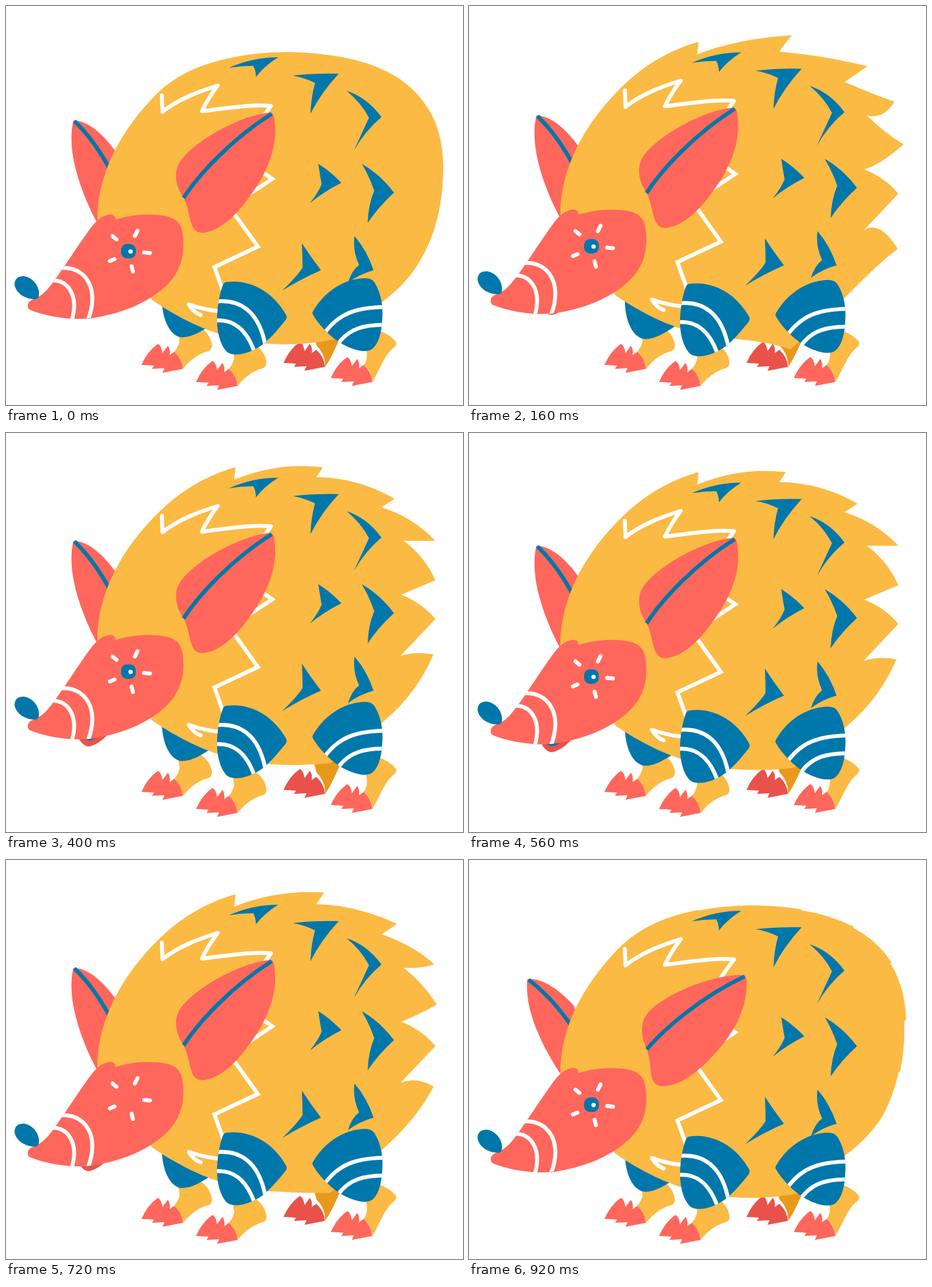
Write an HTML page that moves like this. It is 695 px wide and 607 px high and loops after 0.96 s.

```html
<!DOCTYPE html>
<html lang="en">
<head>
<meta charset="utf-8">
<title>Spiky animal</title>
<style>
html, body { margin: 0; width: 100%; height: 100%; overflow: hidden; background: #fff; }
svg { display: block; width: 100%; height: 100%; }
.y { fill: #fbba44; }
.b { fill: #0077aa; }
.c { fill: #ff675c; }
.d { fill: #e8524a; }
.w, .s { fill: none; stroke: #fff; stroke-width: 6; }
.r { stroke-linecap: round; stroke-linejoin: round; }
.s { stroke: #0077aa; }
</style>
</head>
<body>
<svg viewBox="0 0 695 607">
<defs>
  <path id="toes" d="M206 546Q215 525 231 514Q236 516 238 528L246 517Q250 521 249 531L256 526Q268 537 269 552L238 558L241 551L222 552L225 547Z"/>
  <path id="leg" d="M262 496L264 510Q262 519 256 526Q268 537 269 552Q287 530 308 525Q314 522 313 515Q311 500 296 489Z"/>
  <path id="frontShape" d="M335 420C370 415 406 434 426 470Q428 474 425 478C412 494 396 514 379 522C360 532 341 533 334 524C324 512 320 490 321 472C322 452 325 437 330 424Q332 420 335 420Z"/>
  <path id="rearShape" d="M467 464C482 438 510 415 546 414Q556 414 560 420C571 437 574 458 572 479C571 500 565 517 555 523C543 529 520 520 506 511C491 501 475 484 467 470Q465 467 467 464Z"/>
  <path id="headShape" d="M33 456Q33 449 42 446Q56 441 68 425C86 402 103 373 130 336Q143 319 158 317Q167 317 166 325C191 317 222 315 245 320Q265 325 268 343C273 373 268 399 248 421C222 449 178 468 130 475C92 479 55 470 36 462Q33 460 33 456Z"/>
  <clipPath id="frontClip"><use href="#frontShape"/></clipPath>
  <clipPath id="rearClip"><use href="#rearShape"/></clipPath>
  <clipPath id="headClip"><use href="#headShape"/></clipPath>
</defs>

<g id="farEarBob"><g id="farEar">
  <path class="c" d="M104 174C130 176 153 202 168 223L178 300L150 335L137 327C114 283 92 222 102 176Q102 174 104 174Z"/>
  <path class="s" d="M104 175C126 196 141 218 155 243L166 264"/>
</g></g>

<use href="#leg" class="y"/>
<use href="#toes" class="c"/>
<path id="farThigh" class="b" d="M237 440C236 480 252 504 268 504C284 504 300 493 314 484L314 440Z"/>
<path fill="#e8991c" d="M468 500L472 516Q487 532 485 549Q493 540 510 500Z"/>
<use href="#toes" class="d" x="216" y="-3"/>

<g id="torso">
  <path id="body" class="y"/>
  <path class="b" d="M339 94Q375 78 414 78Q393 91 380 108Q380 98 376 91Q357 91 339 94Z
    M436 106Q470 102 506 103Q479 132 463 164Q464 138 470 117Q454 109 436 106Z
    M518 129Q549 139 571 169Q546 190 529 220Q542 192 552 170Q540 147 518 129Z
    M475 240Q494 252 510 269Q484 282 462 300Q475 284 480 271Q477 255 475 240Z
    M541 240Q569 256 590 284Q566 306 550 330Q551 302 560 281Q553 260 541 240Z
    M450 361Q463 381 479 402Q449 415 420 433Q442 412 451 398Q451 379 450 361Z
    M530 350Q549 372 559 402Q537 408 520 421Q526 402 537 394Q527 373 530 350Z"/>
  <path class="w r" d="M237 136L238 161C264 140 297 129 322 121C312 134 304 147 298 160C334 156 370 149 403 152L384 178"/>
  <path class="w" d="M345 222L405 263L340 306L383 366L317 397L342 467"/>
  <path class="w r" d="M342 466C320 465 297 461 278 454Q285 466 296 470"/>
</g>

<use href="#leg" class="y" x="83" y="26"/>
<use href="#toes" class="c" x="83" y="26"/>
<path class="y" d="M546 505L549 530Q549 540 544 546Q557 557 557 572C568 555 575 532 588 521Q595 516 593 511Q586 501 566 493Z"/>
<use href="#toes" class="c" x="288" y="20"/>

<g id="frontThigh">
  <use href="#frontShape" class="b"/>
  <path class="w" clip-path="url(#frontClip)" d="M315 450C356 444 384 465 394 514M314 479C345 474 367 492 379 530"/>
</g>
<g id="rearThigh">
  <use href="#rearShape" class="b"/>
  <path class="w" clip-path="url(#rearClip)" d="M482 501C504 468 532 458 580 458M503 517C521 489 546 485 580 485"/>
</g>

<g id="head">
  <g id="jaw">
    <path class="d" d="M106 466C111 479 118 489 127 488C137 486 146 479 156 469Z"/>
    <path class="b" d="M112 468Q119 480 128 479Q137 477 142 468Z"/>
  </g>
  <use href="#headShape" class="c"/>
  <path class="w" clip-path="url(#headClip)" d="M74 400C112 390 148 422 123 482M64 418C92 412 113 439 99 482"/>
  <path class="w r" d="M200 342L196 350M162 350L168 355M158 388L165 385M191 396L193 404M210 375L219 376"/>
  <g id="eye">
    <rect class="b" x="175" y="362" width="22.5" height="22" rx="9"/>
    <circle cx="189.5" cy="373.5" r="3.3" fill="#fff"/>
  </g>
  <path class="b" d="M13 424Q13 411 27 411C42 413 52 428 50 441Q49 447 42 446C27 445 15 436 13 424Z"/>
  <g id="ear">
    <path class="c" d="M402 162C360 165 286 204 264 238C255 252 258 272 267 287C277 301 277 318 283 334Q288 346 300 345C334 341 363 303 384 270C404 237 413 205 408 172Q407 162 402 162Z"/>
    <path class="s" d="M270 292C294 255 345 201 404 164"/>
  </g>
</g>
</svg>
<script>
const LOOP = 960, STEP = 40, BEAT = 320;
const $ = id => document.getElementById(id);
const ramp = (t, a, b) => (1 - Math.cos(Math.PI * Math.min(1, Math.max(0, (t - a) / (b - a))))) / 2;
const mix = (a, b, k) => a.map((v, i) => v + (b[i] - v) * k);
const add = (a, b, k = 1) => a.map((v, i) => v + b[i] * k);
const shift = (id, y) => $(id).setAttribute('transform', `translate(0 ${y})`);

// The smooth back: three joined cubics, u runs from 0 to 3.
const NAPE = [231, 132], RUMP = [575, 448];
const back = [
  NAPE, [282, 78], [405, 58], [506, 77],
  [590, 90], [665, 138], [665, 245],
  [665, 325], [640, 400], RUMP
];
function backAt(u) {
  const i = Math.min(2, Math.floor(u)), t = u - i;
  let p = back.slice(3 * i, 3 * i + 4);
  while (p.length > 1) p = p.slice(1).map((q, k) => mix(p[k], q, t));
  return p[0];
}
// Control point of the quadratic that follows the back from u to v.
const backBend = (u, v) => add(mix(backAt(u), backAt(v), .5).map(n => -n), backAt((u + v) / 2), 2);

// Control point that bows a line outwards by a share of its length.
const bow = (a, b, k) => add(mix(a, b, .5), [b[1] - a[1], a[0] - b[0]], k);

const quills = [
  { tip: [349, 62], root: [347, 81], sway: [0, 0] },
  { tip: [482, 62], root: [472, 77], sway: [9, -10] },
  { tip: [591, 110], root: [571, 123], sway: [15, -11] },
  { tip: [653, 174], root: [605, 174], sway: [-6, -21] },
  { tip: [653, 234], root: [601, 256], sway: [8, -16] },
  { tip: [653, 293], root: [600, 349], sway: [0, 0] },
  { tip: [650, 347], root: RUMP, sway: [2, 30] }
];

// grow: 0 smooth, 1 spiky; flare: how far the tips whip out.
function bodyPath(grow, flare) {
  let d = `M222 447L139 325C138 270 164 198 ${NAPE}`;
  const curve = (c, p) => d += `Q${c} ${p}`;
  let from = NAPE, u = 0;
  quills.forEach(({ tip, root, sway }, i) => {
    const v = i < 2 ? (i + 1) / 2 : 1 + (i - 1) / 3;
    const end = i === 6 ? 3 : v, spot = backAt(v), lag = -.3 * flare;
    curve(mix(backBend(u, v), add(bow(from, tip, .13), sway, lag), grow),
      mix(spot, add(tip, sway, flare), grow));
    curve(mix(backBend(v, end), add(bow(tip, root, i === 6 ? .12 : 0), sway, lag), grow),
      mix(backAt(end), root, grow));
    from = root;
    u = v;
  });
  curve([540, 483], mix([500, 507], add([494, 512], [-5, 18], flare), grow));
  curve([450, 517], [404, 514]);
  return d + 'C340 511 280 487 222 447Z';
}

function draw(t) {
  const beat = t % BEAT;
  const rise = ramp(beat, 0, 80);
  const bob = -10 * (rise - ramp(beat, 80, BEAT));
  const hop = -5 * rise + 8.5 * ramp(beat, 80, 180) - 3.5 * ramp(beat, 180, BEAT);
  for (const id of ['farEarBob', 'torso', 'head']) shift(id, bob);
  for (const id of ['farThigh', 'frontThigh', 'rearThigh']) shift(id, hop);

  const grow = ramp(t, 0, 160) - ramp(t, 800, 940);
  const flare = 1 - ramp(t, 160, 280) + ramp(t, 680, 800);
  $('body').setAttribute('d', bodyPath(grow, flare));
  shift('jaw', 12 * (ramp(t, 80, 480) - ramp(t, 600, 880) - 1));

  const open = 1 - ramp(t, 640, 720) + ramp(t, 720, 800);
  $('eye').setAttribute('transform', `translate(0 373) scale(1 ${open}) translate(0 -373)`);

  const flick = t > 800 ? 9.9 * Math.sin(Math.PI * (t - 800) / 160) : 0;
  $('ear').setAttribute('transform', `rotate(${flick} 297 294)`);
  $('farEar').setAttribute('transform', `rotate(${-flick} 161 290)`);
}

const start = performance.now();
function tick() {
  const t = (performance.now() - start) % LOOP;
  draw(Math.floor(t / STEP) * STEP);
  requestAnimationFrame(tick);
}
tick();
</script>
</body>
</html>
```
